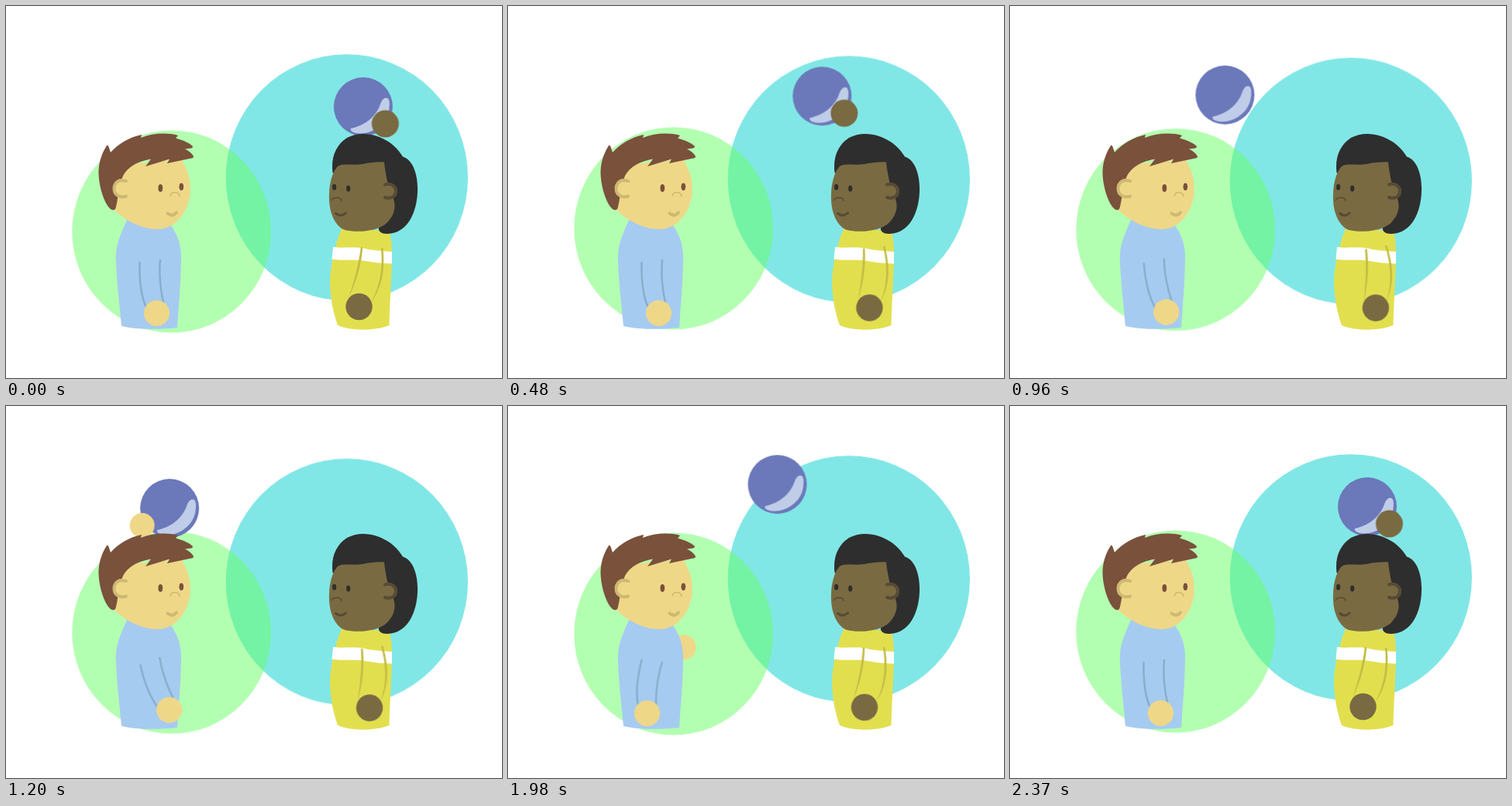
Recreate the animation shown at these times as an HTML page. Size 640x480 px, loop 2400 ms.

```html
<!DOCTYPE html>
<html lang="en">
<head>
<meta charset="utf-8">
<title>Ball toss</title>
<style>
  html, body { margin: 0; width: 100%; height: 100%; overflow: hidden; background: #fff; }
  svg { display: block; width: 640px; height: 480px; }
  .move { animation: 2400ms linear infinite; }

  #sky   { animation-name: sky; }
  #grass { animation-name: grass; }
  #ball  { animation-name: ball; }
  #throw-right { animation-name: throw-right; }
  #throw-left  { animation-name: throw-left; }
  #arm-right { animation-name: arm-right; transform-origin: 471px 311px; }
  #arm-left  { animation-name: arm-left; transform-origin: 186px 329px; }

  @keyframes sky {
    0%, 98.75%, 100% { transform: translateY(0); }
    50% { transform: translateY(5.6px); }
  }
  @keyframes grass {
    0%, 98.75%, 100% { transform: translateY(0); }
    30% { transform: translateY(-6.2px); }
    64% { transform: translateY(6.5px); }
  }
  @keyframes ball {
    0%, 98.75%, 100% { transform: translate(461px, 130px); }
    21.25% { transform: translate(402px, 115.5px); }
    30.2%  { transform: translate(343px, 97.8px); }
    50%    { transform: translate(211px, 132px); }
    71.67% { transform: translate(274px, 115px); }
    80.75% { transform: translate(335px, 98px); }
  }
  @keyframes throw-right {
    0%, 98.75%, 100% { transform: translate(489.5px, 152px); }
    21.25% { transform: translate(430.5px, 137.5px); }
    30%    { transform: translate(403.5px, 322.5px); }
    35.8%, 80% { transform: translate(455px, 345px); }
  }
  @keyframes throw-left {
    0%, 32.5%, 86.5%, 100% { transform: translate(186px, 340px); }
    50%    { transform: translate(175.5px, 154px); }
    67.5%  { transform: translate(234.5px, 155px); }
    71.67% { transform: translate(246px, 156px); }
    82.5%  { transform: translate(227px, 311px); }
  }
  @keyframes arm-right {
    0%, 98.75%, 100% { transform: rotate(0); }
    33.33% { transform: rotate(-13.4deg); }
  }
  @keyframes arm-left {
    0%, 32.5%, 98.75%, 100% { transform: rotate(0); }
    50%   { transform: rotate(-14.2deg); }
    82.5% { transform: rotate(12.7deg); }
  }

  .light { fill: #efd788; }
  .dark  { fill: #7a6a42; }
  .brown { fill: #7a513b; }
  .black { fill: #2e2e2e; }
  .line  { fill: none; stroke-linecap: round; }
  .light-line { stroke: #cdb972; }
  .dark-line  { stroke: #564b36; }
</style>
</head>
<body>
<svg viewBox="0 0 640 480">
  <ellipse id="sky" class="move" cx="439.8" cy="221.3" rx="156.2" ry="159" fill="#81e7e6"/>
  <ellipse id="grass" class="move" cx="213.7" cy="291" rx="128.4" ry="130.6" fill="#69ff65" fill-opacity=".5"/>

  <g id="ball" class="move">
    <circle r="38" fill="#6b78ba"/>
    <path fill="#c0cde8" d="M-16 28C4 24 17 11 22-3C24-9 27-12 30-11.5C34-11 34.5-5 33.5 2C32 22 12 35-5 34.500C-12 34-17 32-16 28Z"/>
  </g>
  <circle id="throw-right" class="move dark" r="17.5"/>
  <circle id="throw-left" class="move light" r="16"/>

  <!-- left child -->
  <path fill="#a6cbf0" d="M156 276C146 299 141 310 142 330C143 360 147 390 149 413C170 418 200 417.500 221 415C223 385 226 350 226 325C226 305 220 293 212 282Z"/>
  <g id="arm-left" class="move">
    <path class="line" stroke="#88acca" stroke-width="2.4" d="M172.500 331C172 350 174 372 180 387M199 328C197 348 200 370 203 382"/>
    <circle class="light" cx="194.500" cy="396.300" r="16.600"/>
  </g>
  <path class="light" d="M148 205L226 198C235 211 239 228 237.500 243C235 265 219 288 196 288C175 288 153 277 139 262Z"/>
  <path class="brown" d="M137 263C128 260 119 232 119.500 213C120 199 125 188 130 180Q132 179 133 183L135 189C144 178 160 169 175 166L174 170C190 164 207 163 222 167L219 170.500C227 173 236 176 241 181Q241 183 239 183.500L231 184.500C236 187 240 190 242 194Q242 196 239 196.500L208 203L211 197.500L180 207L187 197.500C166 201 151 212 149 226C145 238 144 252 141.500 261Q140 264 137 263Z"/>
  <path class="light" d="M157 224C145 220 138 227 138 236C138 246 148 250 157 247Z"/>
  <g class="line light-line">
    <path stroke-width="4" d="M155 226C145 222.500 139.500 229 139.500 235.500C139.500 244 147 248 155 245.500"/>
    <path stroke-width="1.600" d="M212 245C213 239 223 239 224 245.500"/>
    <path stroke-width="4" d="M208.500 267.500Q215 272.500 220 266.500"/>
  </g>
  <g class="brown">
    <ellipse cx="199.300" cy="235" rx="2.900" ry="4.900"/>
    <ellipse cx="226.300" cy="233.200" rx="2.800" ry="4.800"/>
  </g>

  <!-- right child -->
  <path fill="#e2df4f" d="M434 285C425 305 418.500 335 418 355C418 375 422 395 428 412C443 419 475 420 494.500 412C495 390 497 360 498 325C498 310 497.500 302 495 291Z"/>
  <path fill="#fff" d="M422 311C434 313 450 310 463 313C475 316 487 316 498 317V332.500C485 332 475 331 467 329.500C450 326 437 329 420.500 327Z"/>
  <g id="arm-right" class="move">
    <path fill="#c2bd43" d="M457.800 311H460.300C459 332 452 356 442 377C449 355 455 335 457.800 311ZM484 312H486.400C489 335 487 362 471 382C484 360 486 335 484 312Z"/>
    <circle class="dark" cx="455.500" cy="388" r="17.200"/>
  </g>
  <path class="black" d="M421.500 215C419 195 426 179 440 170C455 162 476 163 495 176C503 182 508 188 512 194.500C525 198 532 218 531 240C530 265 519 293.500 492 294C483 294 480 290 481 285L425 214Q423 217 421.500 215Z"/>
  <path class="dark" d="M427 208C432 202 445 206 460 204C470 202 480 201 488 201.500C489 211 491 222 493 230L500 249C503 257 502 268 494 277C484 291 453 293 437 289C423 283 416 264 417 242C417.500 228 421 215 427 208Z"/>
  <path class="dark" d="M488 229C498 226 505 232 505 239C505 247 497 252 488 249Z"/>
  <g class="line dark-line">
    <path stroke-width="4" d="M489 230.500C498 228 503 233 503 239C503 246 496 249.500 489 247"/>
    <path stroke-width="1.600" d="M420.500 250.500C422 246 432 246 433 251"/>
    <path stroke-width="3" d="M425.500 267.500Q432 273 438.500 267"/>
  </g>
  <g class="black">
    <ellipse cx="423.600" cy="233.700" rx="2.600" ry="3.900"/>
    <ellipse cx="441.700" cy="235.500" rx="2.600" ry="4"/>
  </g>
</svg>
</body>
</html>
```
